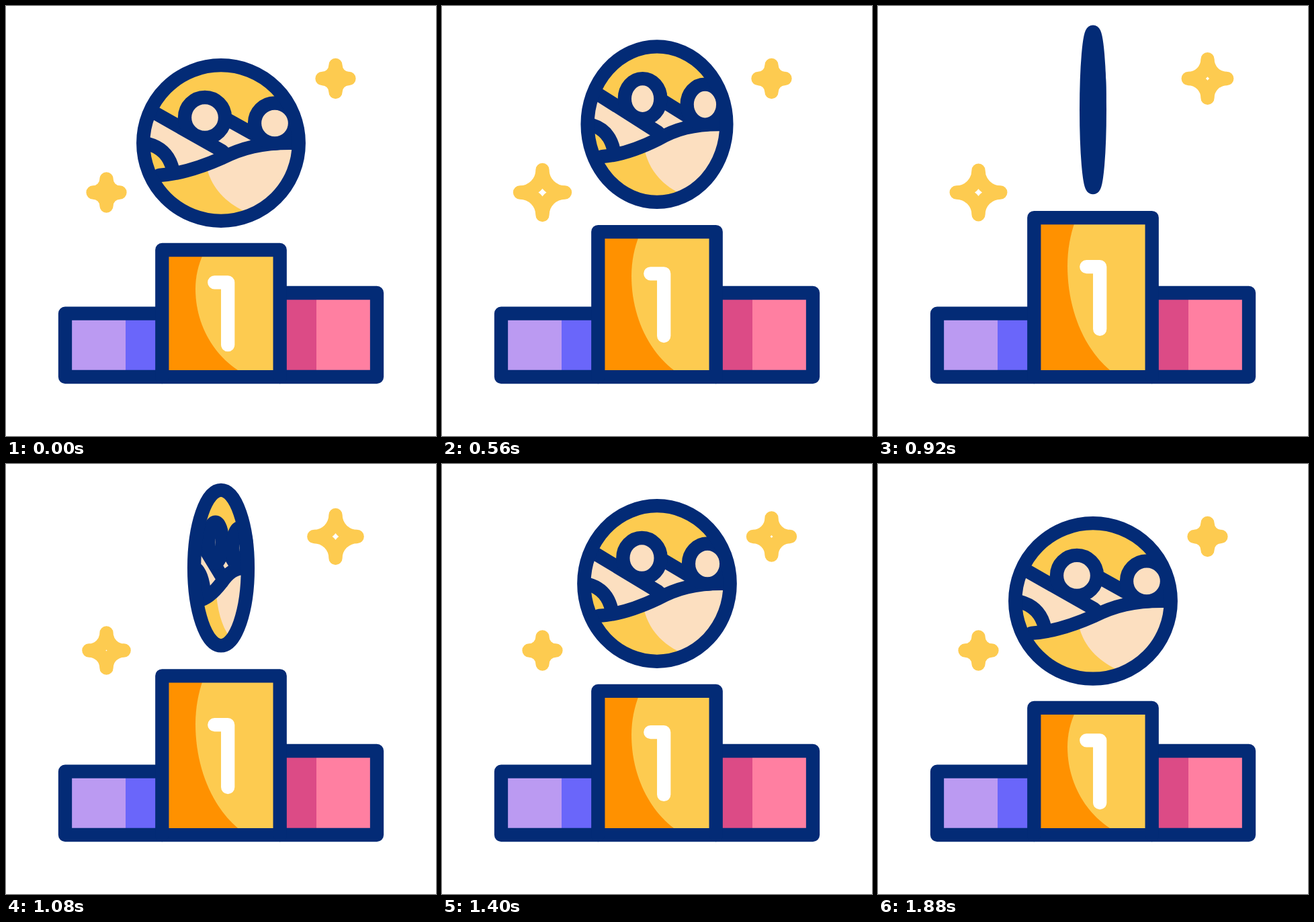
An HTML page for the animation above (2040 ms loop, 640 px wide and 640 px high).

```html
<!DOCTYPE html>
<html lang="en">
<head>
<meta charset="utf-8">
<title>Winner's podium</title>
<style>
  html, body { margin: 0; width: 100%; height: 100%; overflow: hidden; background: #fff; }
  svg { display: block; width: 100vw; height: 100vh; }
  .line, .star, .one { fill: none; stroke: #032b76; stroke-width: 20.3; stroke-linecap: round; stroke-linejoin: round; }
  .star { stroke: #fdcb50; }
  .one { stroke: #fff; }
  #ball .line { vector-effect: non-scaling-stroke; }
  .gold { fill: #fdcb50; }
  .cream { fill: #fcdfc0; }
</style>
</head>
<body>
<svg viewBox="0 0 640 640">
  <path class="star" id="starL"/>
  <path class="star" id="starR"/>

  <!-- side steps -->
  <path fill="#bb9af2" d="M88 457.5H178V552H88Z"/>
  <path fill="#6a66fa" d="M178 457.5H232V552H178Z"/>
  <path fill="#dc4b86" d="M408 427H462V552H408Z"/>
  <path fill="#ff7fa1" d="M462 427H552V552H462Z"/>
  <path class="line" d="M232.3 457.7H88V552H552V427H407.7"/>

  <!-- middle step -->
  <g id="fill">
    <path fill="#ff9100" d="M232 368H350V542H232Z"/>
    <path class="gold" d="M294 368C286 385 282 403 282 421C282 472 307 517 345 542H408V368Z"/>
  </g>
  <path class="line" id="frame"/>
  <path class="one" id="one" d="M310.3 411.4H330.2V504.2"/>

  <!-- coordinates relative to the ball centre -->
  <g id="ball">
    <circle class="gold" r="115.8"/>
    <g transform="translate(-320 -204)">
      <path class="cream" d="M205 160L312 212L300 170H329L390 203L322 226C295 238 262 250 228 252L204 204Z"/>
      <path class="cream" d="M298 236C304 270 328 296 366 310A115.8 115.8 0 0 0 435.8 204C380 203 350 212 322 226Z"/>
      <path class="gold" d="M211 205Q241 213 248 243L222 251Z"/>
      <path class="line" d="M224 160.5L322 216M325 166.5L378 196M211 205Q241 213 248 243
        M228 252C262 250 295 238 322 226C350 212 380 203 430 204"/>
      <circle class="line cream" cx="296" cy="166" r="30" style="fill:#fcdfc0"/>
      <circle class="line cream" cx="400" cy="174.5" r="30" style="fill:#fcdfc0"/>
    </g>
    <circle class="line" r="115.8"/>
  </g>
</svg>
<script>
const LOOP = 2040, STEP = 40;
const $ = id => document.getElementById(id);
const clamp = x => Math.min(1, Math.max(0, x));
const part = (t, from, to) => clamp((t - from) / (to - from));

// cubic-bezier(x1, 0, x2, 1)
function ease(x, x1, x2) {
  let lo = 0, hi = 1;
  for (let i = 0; i < 24; i++) {
    const s = (lo + hi) / 2, r = 1 - s;
    if (3 * r * r * s * x1 + 3 * r * s * s * x2 + s ** 3 < x) lo = s; else hi = s;
  }
  return lo * lo * (3 - 2 * lo);
}

const rise = t => t < 1000
  ? ease(part(t, 80, 1000), .63, .37)
  : 1 - ease(part(t, 1000, 1920), .48, .37);

// The ball narrows to its edge, then opens again.
const spin = t => Math.cos(Math.PI / 2 * (t < 950 ? part(t, 395, 950) : 1 - part(t, 950, 1530)));

// Swell of a star around its peak time
const swell = (t, peak) => (1 + Math.cos(Math.PI * clamp(Math.abs(t - peak) / 600))) / 2;

function star(id, x, y, r) {
  const arc = (dx, dy) => `a${r} ${r} 0 0 0 ${dx * r} ${dy * r}`;
  $(id).setAttribute("d", `M${x} ${y - r}` + arc(1, 1) + arc(-1, 1) + arc(-1, -1) + arc(1, -1) + "Z");
}

function draw(t) {
  const up = rise(t), top = 363 - 48.3 * up;
  const grow = 1 + 48.3 * up / 169;
  star("starL", 149.5, 277.5, 20 + 16.6 * swell(t, 730));
  star("starR", 490.5, 108, 20 + 12.5 * swell(t, 1140));
  $("fill").setAttribute("transform", `translate(0 542) scale(1 ${grow}) translate(0 -542)`);
  $("frame").setAttribute("d", `M232.3 552V${top}H407.7V552`);
  $("one").setAttribute("transform", `translate(0 ${-23.5 * up})`);
  $("ball").setAttribute("transform",
    `translate(320 ${204 - 50 * up}) scale(${Math.max(.002, spin(t))} 1)`);
}

const start = performance.now();
function tick() {
  const t = (performance.now() - start) % LOOP;
  draw(Math.floor(t / STEP) * STEP);
  requestAnimationFrame(tick);
}
tick();
</script>
</body>
</html>
```
